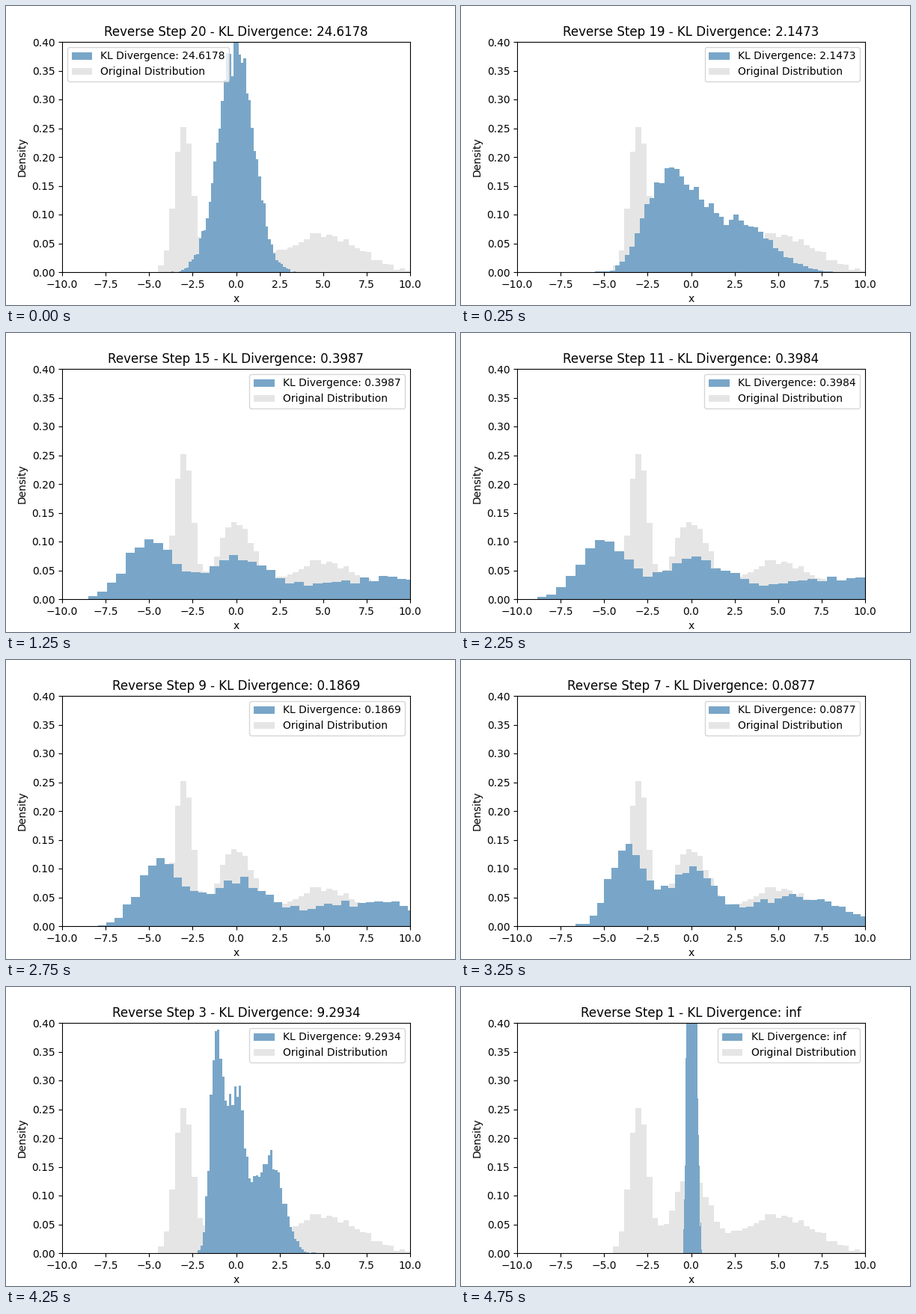
These frames come from a looping animation (600 px wide and 400 px high, 5000 ms). A matplotlib script:

```python
import numpy as np
import matplotlib.pyplot as plt
from matplotlib.animation import FuncAnimation

STEPS = 20
BINS = 50
SAMPLES = 8000
BLUE = "#79a6c8"
GRAY = "#e5e5e5"

MEANS = np.array([-3, 0, 5])
SIGMAS = np.array([0.5, 1, 2])
GRAY_SPAN = (-4.49, 11.64)

# step, spread of the mixture, added noise, left end, right end, divergence
KNOTS = np.array([
    (1, 0.04, 0.115, -0.45, 0.62, np.inf),
    (3, 0.37, 0.29, -2.34, 4.59, 9.2934),
    (7, 1.21, 0.75, -7.04, 13.4, 0.0877),
    (11, 1.70, 1.00, -8.86, 18.9, 0.3984),
    (13, 1.74, 1.00, -9.14, 19.1, 0.4721),
    (15, 1.68, 1.00, -8.50, 18.4, 0.3987),
    (17, 1.39, 1.00, -7.72, 15.2, 0.2268),
    (18, 1.25, 1.00, -7.33, 14.0, 0.1873),
    (20, 0.00, 1.00, -3.72, 3.42, 24.6178),
])


def at_step(step, column):
    return np.interp(step, KNOTS[:, 0], column)


def divergence(step):
    if step < 3:
        return np.inf
    return np.exp(at_step(step, np.log(KNOTS[:, 5])))


def mixture_hist(spread, noise, span, seed):
    """Histogram of samples from the scaled and blurred mixture."""
    rng = np.random.default_rng(seed)
    part = np.arange(SAMPLES) % len(MEANS)
    sigma = np.hypot(spread * SIGMAS, noise)
    x = rng.normal(spread * MEANS[part], sigma[part])
    return np.histogram(x, BINS, range=span, density=True)


def draw_bars(hist, color, label, z):
    h, edges = hist
    ax.bar(edges[:-1], h, np.diff(edges), align="edge", color=color,
           label=label, zorder=z)


base = mixture_hist(1, 0, GRAY_SPAN, seed=0)
fig, ax = plt.subplots(figsize=(6, 4), dpi=100)


def draw(i):
    step = STEPS - i
    spread, noise, lo, hi = (at_step(step, KNOTS[:, c]) for c in range(1, 5))
    text = f"KL Divergence: {divergence(step):.4f}"
    ax.clear()
    draw_bars(mixture_hist(spread, noise, (lo, hi), step), BLUE, text, 1.1)
    draw_bars(base, GRAY, "Original Distribution", 1)
    ax.set_xlim(-10, 10)
    ax.set_ylim(0, 0.4)
    ax.set_xlabel("x")
    ax.set_ylabel("Density")
    ax.set_title(f"Reverse Step {step} - {text}")
    ax.legend(loc="upper left" if step == STEPS else "upper right")


anim = FuncAnimation(fig, draw, frames=STEPS, interval=250,
                     init_func=lambda: None, repeat=True, repeat_delay=0)
plt.show()
```
